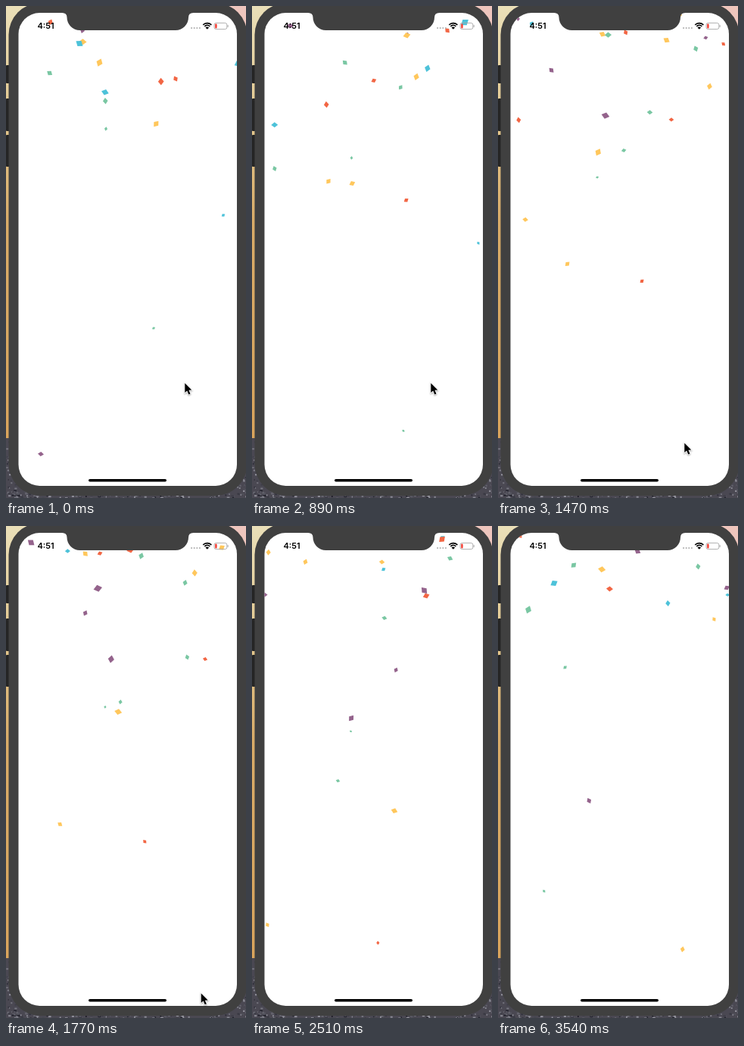
Write an HTML page with a canvas that moves like this. It is 317x649 px and loops after 3.64 s.

```html
<!DOCTYPE html>
<html lang="en">
<head>
<meta charset="utf-8">
<title>Confetti</title>
<style>
  html, body { margin: 0; width: 100%; height: 100%; overflow: hidden; background: #404040; }
  canvas { display: block; }
</style>
</head>
<body>
<canvas id="stage" width="317" height="649"></canvas>
<script>
const ctx = document.getElementById('stage').getContext('2d');
const LOOP = 3640;   // ms
const HOLD = 146.6;  // ms each picture stays
const STEP = 0.1475; // seconds of motion per picture
const BODY = '#404040';
const [TEAL, RED, YELLOW, BLUE, PURPLE] = ['#7ac7a3', '#f26644', '#ffc75c', '#4dc2d9', '#94638c'];
const COLORS = [TEAL, RED, YELLOW, BLUE, PURPLE];

function random(seed) {
  const v = Math.sin(seed * 127.1 + 3.7) * 43758.5453;
  return v - Math.floor(v);
}

function between(low, high, seed) {
  return low + (high - low) * random(seed);
}

// A piece has a place at one moment and drifts from it at constant velocity.
function piece(color, size, moment, [x, y], [vx, vy]) {
  const seed = x + y;
  return {
    color, size, moment, x, y, vx, vy,
    angle: between(0, Math.PI, seed),
    spin: between(-0.5, 7.5, seed + 1)
  };
}

// The few pieces that fall through the open middle of the screen.
const fallers = [
  piece(TEAL, 5.4, 0, [132, 162], [-0.6, 43.4]),
  piece(TEAL, 4.8, 0, [195, 425], [5.6, 153]),
  piece(TEAL, 7.3, 0.89, [196, 108], [-51, 141]),
  piece(RED, 8, 0, [224, 96], [-23, 181]),
  piece(YELLOW, 8.5, 0.89, [132, 235], [-69, 180]),
  piece(YELLOW, 10.5, 1.47, [132, 192], [54, 177]),
  piece(BLUE, 5.5, 0, [287, 276], [13.5, 41.6]),
  piece(PURPLE, 8, 0, [46, 591], [-4, 160]),
  piece(PURPLE, 11, 1.47, [142, 144], [-10.5, 105.5])
];

// The steady shower near the top, fanning out to both sides.
const shower = Array.from({ length: 54 }, (_, i) => {
  const pick = (low, high, trait) => between(low, high, i * 7 + trait);
  const side = pick(0, 1, 1) < 0.6 ? -1 : 1;
  const tilt = pick(0.8, 1.6, 2);
  const speed = pick(100, 175, 3);
  return piece(
    COLORS[i % COLORS.length], pick(7, 12, 4), i * 0.085 - 0.9,
    [pick(16, 305, 5), pick(-8, 95, 6)],
    [side * speed * Math.sin(tilt), speed * Math.cos(tilt)]);
});

function fillBox(color, x, y, w, h, radius = 0) {
  ctx.fillStyle = color;
  ctx.beginPath();
  ctx.roundRect(x, y, w, h, radius);
  ctx.fill();
}

function drawSurroundings() {
  const wall = ctx.createLinearGradient(0, 0, 0, 570);
  wall.addColorStop(0, '#eadfb8');
  wall.addColorStop(0.3, '#e2c489');
  wall.addColorStop(0.5, '#d8ab68');
  wall.addColorStop(1, '#d9a45c');
  fillBox(wall, 0, 0, 317, 570);
  fillBox('#eec5bd', 250, 0, 67, 40);
  fillBox('#4a4852', 0, 570, 317, 79);
  for (let i = 0; i < 1600; i++) {
    const shade = between(25, 165, i);
    fillBox(`rgb(${shade},${shade},${shade + 10})`, random(i + 0.2) * 317,
      between(570, 649, i + 0.4), between(1, 4, i + 0.6), 2);
  }
  for (const [top, height] of [[78, 24], [122, 43], [170, 42]]) {
    fillBox('#252525', 0, top, 6, height, 1);
  }
  fillBox(BODY, 3.5, -4, 315, 650, 42);
}

function drawPiece({ color, size, moment, x, y, vx, vy, angle, spin }, time) {
  const age = time - moment;
  const width = size * (1 - 0.13 * age);
  if (age < -2 * STEP || width < 3) return;
  ctx.save();
  ctx.translate(x + vx * age, y + vy * age);
  ctx.rotate(angle + spin * age);
  ctx.scale(width / 2, width * 0.39);
  ctx.fillStyle = color;
  ctx.beginPath();
  ctx.moveTo(-1, 0);
  ctx.lineTo(0, -1);
  ctx.lineTo(1, 0);
  ctx.lineTo(0, 1);
  ctx.fill();
  ctx.restore();
}

function drawStatusBar() {
  ctx.fillStyle = '#000';
  ctx.font = '600 11px Inter, Roboto, sans-serif';
  ctx.textAlign = 'center';
  ctx.fillText('4:51', 52.5, 30.3);
  for (let i = 0; i < 4; i++) fillBox('#b4b4b4', 244 + i * 3.6, 28, 2.2, 2.2, 1.1);

  ctx.strokeStyle = '#000';
  ctx.lineWidth = 1.6;
  for (const radius of [4.8, 7.6]) {
    ctx.beginPath();
    ctx.arc(265.8, 30.2, radius, -Math.PI * 0.76, -Math.PI * 0.24);
    ctx.stroke();
  }
  ctx.beginPath();
  ctx.moveTo(265.8, 30.8);
  ctx.arc(265.8, 30.8, 3.2, -Math.PI * 0.76, -Math.PI * 0.24);
  ctx.fillStyle = '#000';
  ctx.fill();

  ctx.strokeStyle = '#a8a8a8';
  ctx.lineWidth = 0.9;
  ctx.beginPath();
  ctx.roundRect(275, 22.4, 16.8, 8.2, 2.4);
  ctx.stroke();
  fillBox('#a8a8a8', 292.5, 25, 1.1, 3, 0.5);
  fillBox('#f43b30', 276.2, 23.6, 2.4, 5.8, 0.8);
}

function drawNotch() {
  ctx.fillStyle = BODY;
  ctx.beginPath();
  ctx.moveTo(74, 8);
  ctx.lineTo(74, 9);
  ctx.quadraticCurveTo(80.5, 9, 80.5, 15);
  ctx.arcTo(80.5, 32, 98, 32, 17);
  ctx.arcTo(241, 32, 241, 15, 17);
  ctx.lineTo(241, 15);
  ctx.quadraticCurveTo(241, 9, 247.5, 9);
  ctx.lineTo(247.5, 8);
  ctx.fill();
}

// The pointer rests, then slides down in two strokes and leaves.
function cursorAt(time) {
  const stroke = (from, to) => Math.min(1, Math.max(0, (time - from) / (to - from)));
  const first = stroke(1.18, 1.47);
  const second = stroke(1.55, 1.82);
  return [236.3 + 10 * first + 14 * second, 497.5 + 79 * first + 49 * second];
}

function drawCursor([x, y]) {
  ctx.save();
  ctx.translate(x, y);
  ctx.scale(0.9, 0.9);
  ctx.beginPath();
  ctx.moveTo(0, 0);
  for (const [px, py] of [[0, 14], [3.2, 11.2], [5.5, 16.6], [8, 15.5], [5.7, 10.3], [10, 10]]) {
    ctx.lineTo(px, py);
  }
  ctx.closePath();
  ctx.lineWidth = 1.8;
  ctx.strokeStyle = '#fff';
  ctx.shadowColor = 'rgba(0,0,0,.35)';
  ctx.shadowBlur = 2;
  ctx.shadowOffsetY = 1;
  ctx.stroke();
  ctx.shadowColor = 'transparent';
  ctx.fillStyle = '#000';
  ctx.fill();
  ctx.restore();
}

function draw(time) {
  drawSurroundings();
  ctx.save();
  fillBox('#fff', 16.5, 9, 288.5, 624, 28);
  ctx.clip();
  for (const item of [...shower, ...fallers]) drawPiece(item, time);
  drawStatusBar();
  fillBox('#000', 109, 624, 103, 3.6, 1.8);
  ctx.restore();
  drawNotch();
  if (time < 2) drawCursor(cursorAt(time));
}

const start = performance.now();
function tick() {
  const elapsed = (performance.now() - start) % LOOP;
  draw(Math.floor(elapsed / HOLD) * STEP);
  requestAnimationFrame(tick);
}
tick();
</script>
</body>
</html>
```
